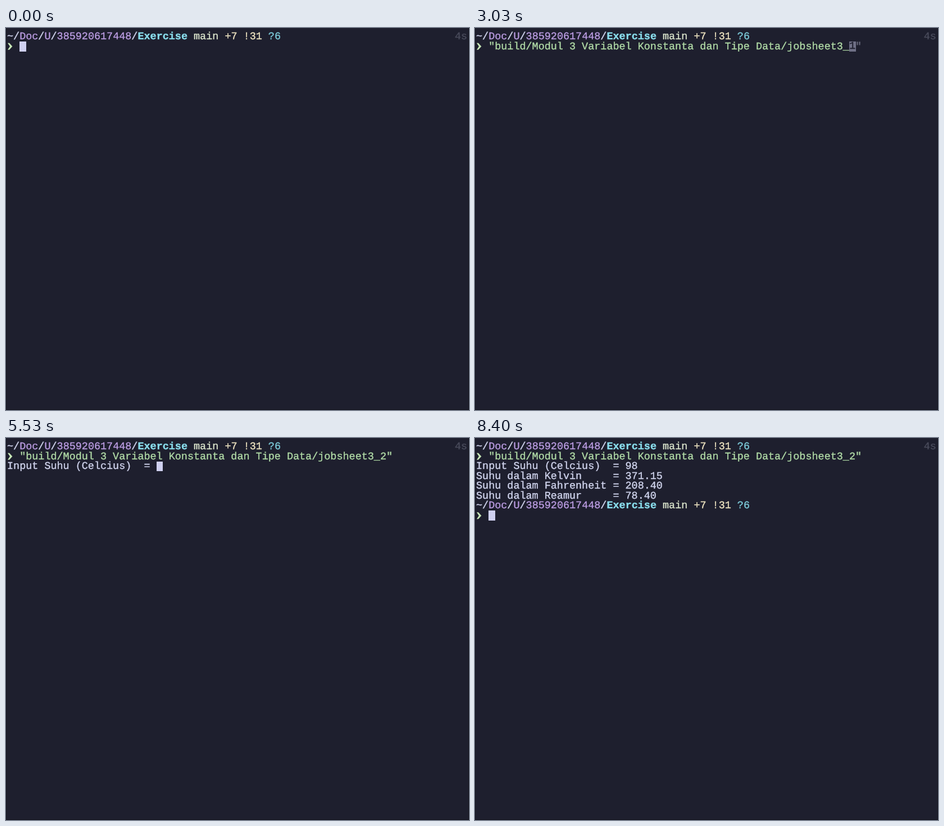
Animation, 824 px wide and 680 px high, one loop 9.1 s. Source, as an HTML page:

```html
<!DOCTYPE html>
<html lang="id">
<head>
<meta charset="utf-8">
<title>Terminal</title>
<style>
  html, body { margin: 0; width: 100%; height: 100%; overflow: hidden; background: #1e1f2e; }
  #term {
    position: absolute; left: 0; top: 0; width: 824px; height: 680px; overflow: hidden;
    box-sizing: border-box; background: #1e1f2e; color: #cfd3ec;
    font: 18.45px/17.57px "Liberation Mono", "Courier New", monospace;
    text-rendering: geometricPrecision; -webkit-text-stroke: .4px currentColor;
  }
  #term::after {
    content: ""; position: absolute; inset: 0;
    border: solid #12131c; border-width: 0 1px 1px;
  }
  .row { position: absolute; left: 2px; height: 17.57px; white-space: pre; }
  .dir { color: #b99be0; }
  .here { color: #89dceb; font-weight: bold; }
  .branch { color: #d9e3cb; }
  .dirty { color: #ece2c0; }
  .new { color: #7cc9d8; }
  .time { color: #484a5a; }
  .cmd { color: #afd9a5; }
  .bad { color: #ee8bb0; font-weight: bold; }
  .hint { color: #66687a; }
  .cur, .arrow {
    display: inline-block; position: relative; top: -.6px;
    height: 17.57px; vertical-align: top;
  }
  .cur { background: #cfd0f0; color: #1e1f2e; padding-right: .8px; margin-right: -.8px; }
  .cur.dim { background: #6f7086; }
  .arrow {
    background: #c6e5b6;
    clip-path: polygon(1px 2.8px, 4px 2.8px, 9.4px 8.8px, 4px 14.8px, 1px 14.8px, 5px 8.8px);
  }
</style>
</head>
<body>
<div id="term"></div>
<script>
const LOOP = 9100, TOP = 7, PITCH = 17.57;
const term = document.getElementById('term');

const span = (cls, text) => `<span class="${cls}">${text}</span>`;
const cursor = span('cur', ' ');
const arrow = span('arrow', ' ') + ' ';

const path = '~/' + span('dir', 'Doc') + '/' + span('dir', 'U') + '/' +
  span('dir', '385920617448') + '/' + span('here', 'Exercise') + ' ' +
  span('branch', 'main') + ' ' + span('dirty', '+7 !31') + ' ' + span('new', '?6');
const head = path + ' '.repeat(28) + span('time', '4s');

const command = n => `"build/Modul 3 Variabel Konstanta dan Tipe Data/jobsheet3_${n}"`;

// Typed part, then the cursor over the dimmed suggestion.
function typing(n, count, cls = 'cmd') {
  const full = command(n), rest = full.slice(count);
  const tail = rest ? span('cur dim', rest[0]) + span('hint', rest.slice(1)) : cursor;
  return [head, arrow + span(cls, full.slice(0, count)) + tail];
}

const entered = [head, arrow + span('cmd', command(2))];
const ask = value => [...entered, 'Input Suhu (Celcius)  = ' + value];
const result = (label, value) => label.padEnd(22) + '= ' + value.toFixed(2);

const celsius = 98;
const output = [
  ...ask(celsius),
  result('Suhu dalam Kelvin', celsius + 273.15),
  result('Suhu dalam Fahrenheit', celsius * 1.8 + 32),
  result('Suhu dalam Reamur', celsius * 0.8)
];
const size = command(1).length;

const steps = [
  [0, [head, arrow + cursor]],
  [970, typing(1, 1, 'bad')],
  [1600, typing(1, 2, 'bad')],
  [1670, typing(1, 3, 'bad')],
  [1730, typing(1, 4, 'bad')],
  [1800, typing(1, 5, 'bad')],
  [1870, typing(1, 6)],
  [1930, typing(1, 7)],
  [2500, typing(1, size)],
  [2900, typing(1, size - 1)],
  [2970, typing(1, size - 2)],
  [3130, typing(2, size - 1)],
  [3570, typing(2, size)],
  [4100, [...entered, cursor]],
  [4170, ask(cursor)],
  [5570, ask('9' + cursor)],
  [6000, ask('98' + cursor)],
  [6930, [...output, cursor]],
  [7000, [...output, path, arrow + cursor]]
];

let shown = -1;
function draw(now) {
  const t = now % LOOP;
  const i = steps.findLastIndex(([at]) => at <= t);
  if (i !== shown) {
    shown = i;
    term.innerHTML = steps[i][1].map((row, y) =>
      `<div class="row" style="top:${(TOP + y * PITCH).toFixed(2)}px">${row}</div>`).join('');
  }
}

const start = performance.now();
function tick() {
  draw(performance.now() - start);
  requestAnimationFrame(tick);
}
tick();
</script>
</body>
</html>
```
